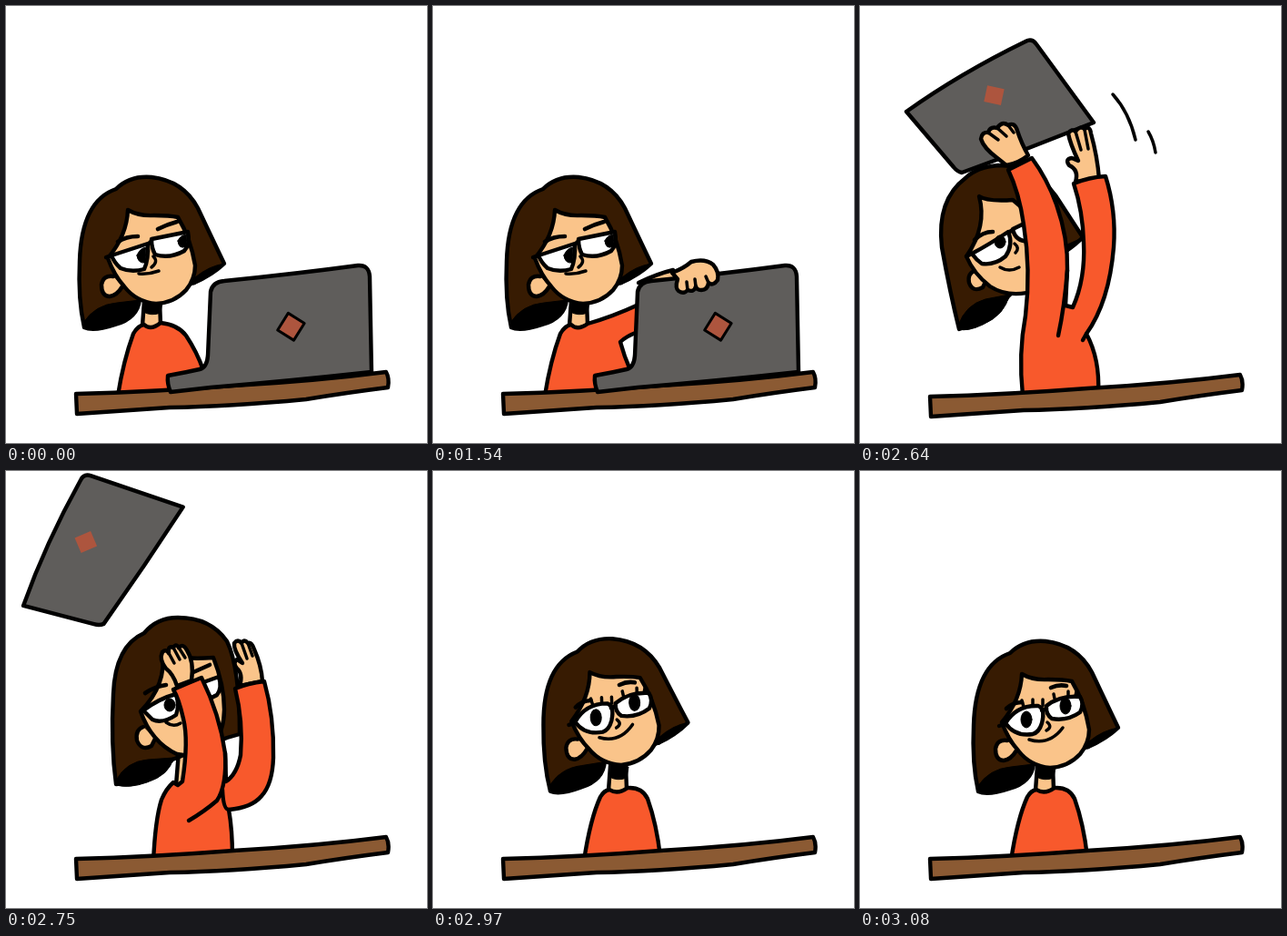
An HTML page that plays this animation: 463x480 px, repeating every 3300 ms.

```html
<!DOCTYPE html>
<html lang="en">
<head>
<meta charset="utf-8">
<title>Laptop toss</title>
<style>
html, body { margin: 0; width: 100%; height: 100%; overflow: hidden; background: #fff; }
svg { display: block; width: 100%; height: 100%; }
path, ellipse { stroke: #000; stroke-width: 4.4; stroke-linecap: round; stroke-linejoin: round; fill: none; }
.hair { fill: #371b02; }
.skin { fill: #fac48a; }
.shirt { fill: #f8592c; }
.metal { fill: #5f5d5b; }
.wood { fill: #8b5a33; }
.white { fill: #fff; }
.ink { fill: #000; stroke-width: 1; }
.thin { stroke-width: 3.5; }
.brow { stroke-width: 4.6; }
.badge { fill: #ad553e; }
.pose { visibility: hidden; animation: 3300ms step-end infinite; }
#stare { animation-name: stare; }
#reach { animation-name: reach; }
#shut { animation-name: shut; }
#lift { animation-name: lift; }
#toss { animation-name: toss; }
#fly { animation-name: fly; }
#settle { animation-name: settle; }
#smile { animation-name: smile; }
@keyframes stare { 0% { visibility: visible } 46.6667%, 100% { visibility: hidden } }
@keyframes reach { 0% { visibility: hidden } 46.6667% { visibility: visible } 66.6667%, 100% { visibility: hidden } }
@keyframes shut { 0% { visibility: hidden } 66.6667% { visibility: visible } 80%, 100% { visibility: hidden } }
@keyframes lift { 0% { visibility: hidden } 80% { visibility: visible } 83.3333%, 100% { visibility: hidden } }
@keyframes toss { 0% { visibility: hidden } 83.3333% { visibility: visible } 86.6667%, 100% { visibility: hidden } }
@keyframes fly { 0% { visibility: hidden } 86.6667% { visibility: visible } 90%, 100% { visibility: hidden } }
@keyframes settle { 0% { visibility: hidden } 90% { visibility: visible } 93.3333%, 100% { visibility: hidden } }
@keyframes smile { 0% { visibility: hidden } 93.3333%, 100% { visibility: visible } }
</style>
</head>
<body>
<svg viewBox="0 0 463 480" preserveAspectRatio="none">
<defs>
  <g id="neck">
    <path class="skin" d="M152 324 L150 351 Q158 357 170 350 L169 324Z"/>
    <path class="ink" d="M151 325 H172 L170 337 Q160 341 151 336Z"/>
  </g>
  <g id="head">
    <path class="hair" d="M86 353 Q79 322 81 280 Q83 214 121 201 Q136 186 160 188 Q195 192 211 222 Q227 256 240 283 Q226 296 207 304 L147 322 Q145 343 120 350 Q96 358 86 353Z"/>
    <path class="ink" d="M85 348 Q98 328 122 326 L147 323 Q147 342 122 350 Q96 359 86 354Z"/>
    <path class="ink" d="M207 306 L241 283 Q224 285 208 298Z"/>
    <path class="skin" d="M118 297 Q107 295 105 306 Q105 319 114 319 Q122 318 128 308"/>
    <path class="skin" d="M134 224 Q146 231 163 230 Q180 230 189 232 Q203 255 208 285 Q208 300 198 312 Q185 326 165 327 Q143 325 130 308 Q119 296 112 277 Q133 252 134 224Z"/>
  </g>
  <g id="specs">
    <path class="white" d="M116 274 L156 261 Q157 278 152 289 Q138 293 126 288 Q119 282 116 274Z"/>
    <path class="white" d="M160 256 L200 248 Q203 261 196 269 Q180 278 164 273 Q160 266 160 256Z"/>
    <path d="M110 276 L116 274 M156 262 L160 258"/>
    <path class="thin" d="M162 275 Q168 281 160 287"/>
  </g>
  <g id="frown">
    <path class="brow" d="M123 259 Q132 253 145 253 M167 245 Q177 240 188 237"/>
    <path class="thin" d="M146 294 Q157 295 168 291"/>
  </g>
  <g id="headUp">
    <use href="#head"/><use href="#specs"/><use href="#frown"/>
    <path class="ink" d="M144 274 Q147 266 154 265 L153 282 Q145 283 144 274Z M189 258 Q192 251 199 251 L198 264 Q190 268 189 258Z"/>
  </g>
  <g id="headDown">
    <use href="#head"/><use href="#specs"/><use href="#frown"/>
    <ellipse class="ink" cx="146" cy="282" rx="5.5" ry="7"/>
    <ellipse class="ink" cx="188" cy="267" rx="5.5" ry="7"/>
  </g>
  <g id="headHappy">
    <use href="#head"/>
    <path class="white" d="M116 278 Q128 258 152 259 Q160 262 156 278 Q153 288 146 290 Q126 293 116 278Z"/>
    <path class="white" d="M161 259 Q176 247 198 249 Q203 257 198 266 Q184 276 167 273 Q160 268 161 259Z"/>
    <path d="M109 281 L116 279 M156 264 L161 262"/>
    <ellipse class="ink" cx="139" cy="274" rx="6" ry="9"/>
    <ellipse class="ink" cx="182" cy="259" rx="6" ry="9"/>
    <path class="thin" d="M136 260 L134 253 M146 258 L146 252 M157 259 L157 252 M170 251 L169 246 M185 248 L185 243 M193 248 L194 243"/>
    <path class="brow" d="M117 262 Q124 255 134 255 M166 239 Q175 235 183 237"/>
    <path class="thin" d="M162 277 Q168 282 161 286 M142 296 Q164 303 179 283"/>
  </g>
  <g id="headLift">
    <path class="hair" d="M109 355 Q99 315 90 265 Q84 213 116 189 Q128 177 152 175 Q190 175 215 208 L245 254 Q232 268 200 285 L163 319 Q150 343 109 355Z"/>
    <path class="ink" d="M108 351 Q116 328 138 322 L164 317 Q160 339 135 350 Q118 358 109 355Z"/>
    <path class="ink" d="M222 276 L246 254 L228 262Z"/>
    <path class="skin" d="M126 291 Q118 294 120 304 Q124 315 135 309 L138 303"/>
    <path class="skin" d="M131 209 Q140 215 168 213 L200 240 L195 312 Q165 322 143 308 Q125 294 117 275 Q140 242 131 209Z"/>
    <path class="white" d="M123 272 Q142 262 163 248 Q169 262 160 275 Q148 285 134 283 Q128 279 123 272Z"/>
    <path class="white" d="M168 245 L195 232 V258 Q171 262 168 245Z"/>
    <path d="M117 275 L123 272 M163 249 L168 246"/>
    <ellipse class="ink" cx="154" cy="259" rx="6" ry="7"/>
    <path class="brow" d="M126 257 Q135 248 146 248"/>
    <path class="thin" d="M170 261 Q176 266 171 271 M154 287 Q164 293 175 287"/>
  </g>
  <g id="headToss">
    <path class="hair" d="M121 344 Q115 300 118 245 Q120 192 152 178 Q166 161 189 161 Q225 161 243 187 Q257 215 257 289 L243 293 L183 317 Q165 342 121 344Z"/>
    <path class="ink" d="M121 340 Q132 319 156 317 L184 315 Q180 334 155 342 Q135 349 121 345Z"/>
    <path class="skin" d="M151 281 Q142 284 144 296 Q149 308 160 302 L164 294"/>
    <path class="skin" d="M172 199 Q190 208 228 205 Q240 235 240 262 Q240 285 228 300 Q205 315 188 311 Q160 298 148 264 Q177 235 172 199Z"/>
    <path class="white" d="M151 263 Q168 250 187 245 Q191 258 187 268 Q172 278 161 273Z"/>
    <path class="white" d="M206 236 L234 226 Q238 238 232 246 Q222 252 208 252Z"/>
    <ellipse class="ink" cx="180" cy="257" rx="6" ry="7"/>
    <path class="brow" d="M153 244 Q163 237 176 235 M206 221 L224 213"/>
    <path class="thin" d="M176 276 Q184 282 192 277"/>
  </g>
  <path id="desk" class="wood" d="M77 426 Q160 424 250 417 Q340 412 418 402 Q422 409 420 419 Q372 425 330 432 Q245 440 180 441 Q120 445 78 448Z"/>
  <g id="openLaptop">
    <path class="metal" d="M178 406 Q200 402 213 399 Q221 397 222 384 L225 314 Q227 303 240 302 Q320 294 387 285 Q399 284 400 297 L402 402 Q310 412 225 419 L181 424 Q177 415 178 406Z"/>
    <path class="badge" d="M303 341 L324 341 L324 363 L303 363Z" style="stroke-width:3" transform="rotate(32 313 352)"/>
  </g>
  <g id="raisedLaptop">
    <path class="metal" d="M51 116 Q110 74 182 39 Q189 35 194 42 L257 128 Q185 157 112 183 Q107 182 103 177Z"/>
    <path class="badge" d="M138 89 H157 V107 H138Z" style="stroke:none" transform="rotate(12 147 98)"/>
  </g>
  <g id="thrower">
    <path class="skin" d="M190 308 L187 345 L205 348 V308Z"/>
    <use href="#headToss"/>
    <path class="skin" d="M257 236 Q261 223 254 217 Q249 211 254 207 L260 211 Q250 196 251 189 Q255 184 259 189 Q262 184 266 189 Q270 187 273 196 Q281 214 282 231Z"/>
    <path class="thin" d="M259 189 L265 206 M266 189 L271 203"/>
    <path class="shirt" d="M162 430 Q164 383 171 361 Q176 349 184 342 L189 345 L194 341 Q201 296 195 272 Q190 250 184 240 Q200 233 215 227 Q235 267 241 310 L242 341 Q254 333 258 312 Q261 275 252 239 Q266 233 284 231 Q295 270 294 315 Q293 344 281 357 Q270 370 245 372 Q249 394 249 425Z"/>
    <path d="M241 310 Q243 345 232 362 Q218 374 201 384 M245 372 Q239 372 238 350"/>
    <path class="skin" d="M188 236 Q184 223 176 217 Q168 207 172 199 Q176 195 179 200 Q178 191 184 194 Q187 189 190 194 Q195 189 199 197 Q207 209 204 230Z"/>
    <path class="thin" d="M179 200 L185 211 M184 194 L191 207 M190 194 L197 205"/>
  </g>
  <g id="sitter">
    <use href="#neck" x="43"/>
    <path class="shirt" d="M166 428 Q173 382 184 358 Q188 351 194 350 Q203 356 214 348 Q230 347 236 360 Q246 388 250 424Z"/>
  </g>
</defs>

<g id="stare" class="pose">
  <use href="#neck"/>
  <path class="shirt" d="M123 428 Q129 390 140 360 Q145 351 152 350 Q159 357 170 348 Q189 350 198 362 Q210 380 217 400 L215 424Z"/>
  <use href="#headUp"/>
  <use href="#desk"/><use href="#openLaptop"/>
</g>

<g id="reach" class="pose">
  <use href="#neck"/>
  <path class="shirt" d="M123 428 Q129 390 140 360 Q145 351 152 350 Q159 357 170 349 Q198 341 226 328 L225 358 Q212 363 206 369 Q210 384 217 400 L215 424Z"/>
  <path class="skin" d="M226 304 Q247 294 264 290 L268 300Z"/>
  <use href="#headUp"/>
  <use href="#desk"/><use href="#openLaptop"/>
  <path class="skin" d="M263 293 Q276 288 284 281 Q299 277 308 284 Q315 292 313 301 Q308 308 303 304 Q302 312 295 312 Q290 312 289 308 Q287 315 280 312 Q276 317 270 313 Q266 310 269 300Z"/>
  <path class="thin" d="M303 304 L300 297 M289 308 L288 300 M280 312 L279 303"/>
</g>

<g id="shut" class="pose">
  <use href="#neck"/>
  <path class="shirt" d="M101 428 Q94 416 101 404 Q113 382 140 357 Q145 351 152 350 Q159 357 170 348 Q191 349 202 360 Q215 374 224 393 L205 424Z"/>
  <use href="#headDown"/>
  <use href="#desk"/>
  <path class="metal" d="M180 396 Q198 393 215 390 Q305 384 394 374 Q401 383 401 402 Q305 411 205 419 L182 417Z"/>
  <path class="skin" d="M305 382 Q309 370 331 368 Q344 374 354 378 Q358 383 349 384 Q348 389 341 385 Q337 391 330 386 Q322 390 318 384Z"/>
  <path class="thin" d="M341 385 L335 380 M330 386 L325 381 M349 384 L344 379"/>
  <path d="M132 401 Q150 404 168 404"/>
  <path class="skin" d="M167 404 Q171 399 168 392 Q172 386 177 390 L181 402 Q196 397 211 402 Q217 406 208 409 Q213 414 204 414 Q203 419 193 417 Q180 423 169 417Z"/>
  <path class="thin" d="M208 409 L196 406 M204 414 L193 411"/>
</g>

<g id="lift" class="pose">
  <use href="#headLift"/>
  <use href="#raisedLaptop"/>
  <path class="skin" d="M237 193 Q241 180 230 175 Q225 168 233 167 L240 170 Q231 151 229 140 Q233 134 237 138 Q242 131 247 135 Q253 131 254 140 Q261 165 263 190Z"/>
  <path class="thin" d="M237 138 L243 158 M247 136 L251 157"/>
  <path class="shirt" d="M179 428 Q174 382 182 340 Q188 290 180 240 Q175 205 163 180 Q175 174 189 167 Q206 190 216 218 Q229 255 228 290 L226 329 L234 331 Q248 300 246 260 Q245 225 235 195 Q252 188 270 187 Q282 225 279 265 Q274 325 249 360 Q264 388 262 425Z"/>
  <path d="M228 290 Q225 330 218 362 M249 360 L245 367"/>
  <path class="skin" d="M161 175 L151 167 Q136 156 133 146 Q134 138 141 139 Q143 132 151 134 Q156 126 163 131 Q170 127 173 137 Q178 152 185 164 Q174 173 161 175Z"/>
  <path class="thin" d="M141 139 L152 147 M151 134 L161 143 M163 131 L169 139"/>
  <path class="thin" d="M278 97 Q296 117 303 147 M317 138 Q323 148 325 161"/>
  <use href="#desk" y="3"/>
</g>

<g id="toss" class="pose">
  <use href="#thrower"/>
  <use href="#raisedLaptop" transform="translate(100 84) rotate(-35) translate(-154 -110)"/>
  <use href="#desk"/>
</g>

<g id="fly" class="pose">
  <path class="metal" d="M26 198 Q48 157 66 113 Q71 101 82 100 L125 98 Q126 105 121 115 L99 177 Q93 195 80 198Z"/>
  <path class="badge" d="M72 132 H86 V147 H72Z" style="stroke:none"/>
  <path class="thin" d="M190 96 Q230 109 254 150 M217 140 Q228 144 238 156 M62 226 Q82 222 98 239"/>
  <use href="#thrower"/>
  <use href="#desk"/>
</g>

<g id="settle" class="pose">
  <use href="#sitter"/>
  <use href="#headHappy" transform="translate(42 -4) rotate(-2 163 326)"/>
  <use href="#desk"/>
</g>

<g id="smile" class="pose">
  <use href="#sitter"/>
  <use href="#headHappy" x="44" y="-1"/>
  <use href="#desk"/>
</g>
</svg>
</body>
</html>
```
